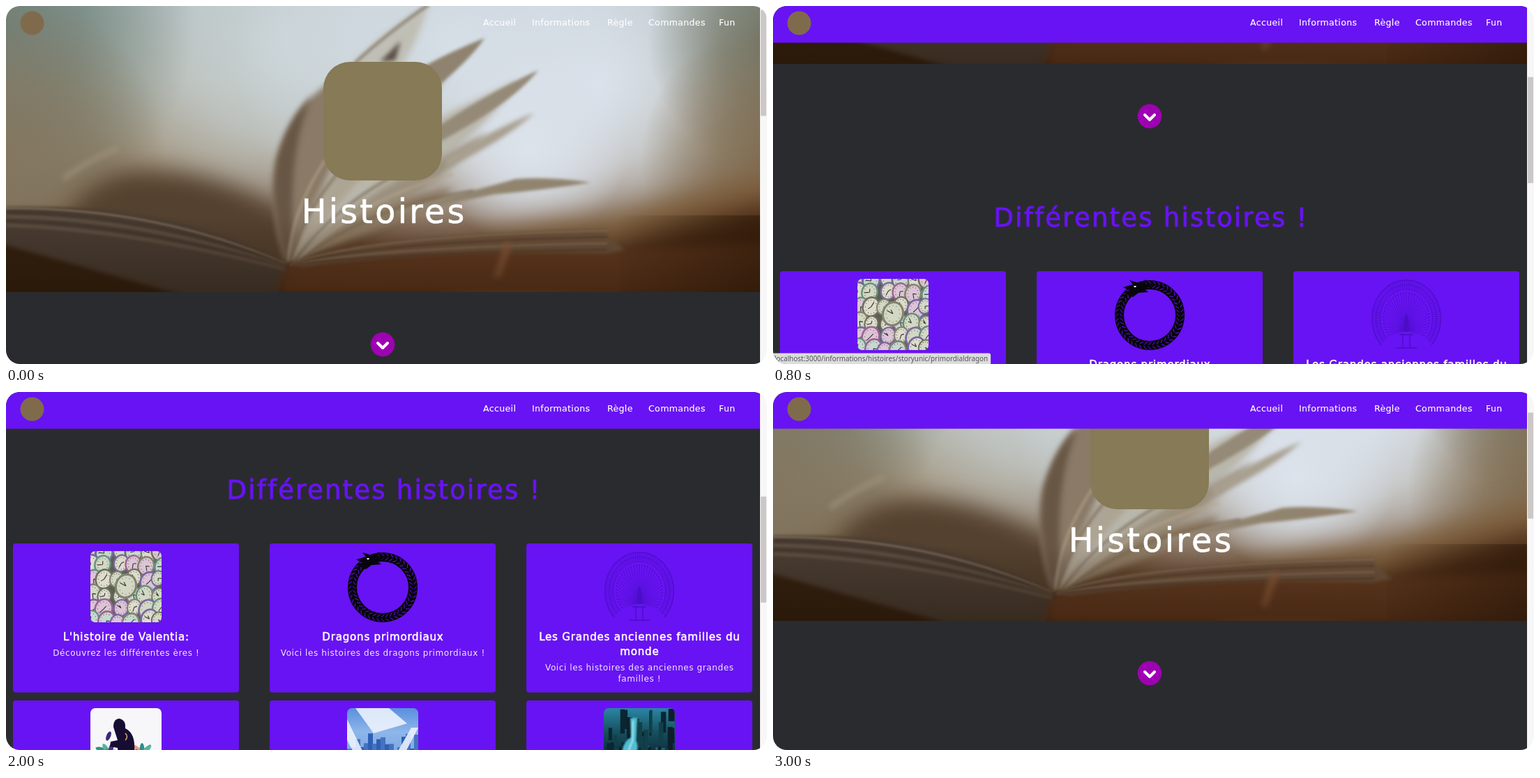
An HTML page with a canvas that plays this animation: 1091 by 513 pixels, repeating every 3200 ms.

```html
<!DOCTYPE html>
<html lang="fr">
<head>
<meta charset="utf-8">
<title>Histoires</title>
<style>
html, body { margin: 0; width: 100%; height: 100%; overflow: hidden; background: #fff; }
canvas { display: block; }
</style>
</head>
<body>
<canvas id="stage" width="1091" height="513"></canvas>
<script>
const W = 1091, H = 513, VIEW = 1081, HERO = 410, TILE = 102;
const STEP = 200, TURN = 8, SCROLL = 81.75;
const PURPLE = '#6813f3', DARK = '#2a2b2f';
const ctx = document.getElementById('stage').getContext('2d');

let seed = 7;
const rnd = () => (seed = (seed * 16807) % 2147483647) / 2147483647;
const pick = list => list[Math.floor(rnd() * list.length)];

function layer(w, h) {
  const c = document.createElement('canvas');
  c.width = w;
  c.height = h;
  return c.getContext('2d');
}

function fill(g, color, path, blur = 0) {
  g.filter = blur ? `blur(${blur}px)` : 'none';
  g.fillStyle = color;
  g.fill(new Path2D(path));
  g.filter = 'none';
}

function line(g, color, width, path, blur = 0) {
  g.filter = blur ? `blur(${blur}px)` : 'none';
  g.strokeStyle = color;
  g.lineWidth = width;
  g.stroke(new Path2D(path));
  g.filter = 'none';
}

function box(g, color, x, y, w, h, r = 0) {
  g.fillStyle = color;
  g.beginPath();
  g.roundRect(x, y, w, h, r);
  g.fill();
}

function oval(g, color, x, y, rx, ry = rx, turn = 0) {
  g.fillStyle = color;
  g.beginPath();
  g.ellipse(x, y, rx, ry, turn, 0, 7);
  g.fill();
}

function glow(g, x, y, r, color) {
  const grad = g.createRadialGradient(x, y, 0, x, y, r);
  grad.addColorStop(0, color);
  grad.addColorStop(0.45, color + 'b0');
  grad.addColorStop(1, color + '00');
  g.fillStyle = grad;
  g.fillRect(x - r, y - r, 2 * r, 2 * r);
}

function ramp(g, x, y, w, h, dx, dy, ...colors) {
  const grad = g.createLinearGradient(x, y, x + dx, y + dy);
  colors.forEach((c, i) => grad.addColorStop(i / (colors.length - 1), c));
  g.fillStyle = grad;
  g.fillRect(x, y, w, h);
}

// size, letter spacing in em, extra weight
const STYLES = {
  hero: [47.5, 0.07, 0.7], heading: [37, 0.06, 0.9], title: [15, 0.055, 0.55],
  body: [12, 0.05, 0], nav: [12.5, 0.03, 0.15]
};

function text(g, style, str, x, y, color = '#fff', align = 'center') {
  const [size, gap, bold] = STYLES[style];
  g.font = `${size}px "DejaVu Sans", sans-serif`;
  g.letterSpacing = size * gap + 'px';
  g.textAlign = align;
  if (align === 'center') x += size * gap / 2;
  g.fillStyle = g.strokeStyle = color;
  g.fillText(str, x, y);
  if (bold) {
    g.lineWidth = bold;
    g.lineJoin = 'round';
    g.strokeText(str, x, y);
  }
  g.letterSpacing = '0px';
}

function sky(g) {
  ramp(g, 0, 0, VIEW, HERO, 0, HERO, '#a3b0ae', '#a9a897', '#9b8a70', '#74553a', '#3c2412');
  glow(g, 400, 50, 310, '#c9d3d6');
  glow(g, 640, 60, 310, '#d5dee6');
  glow(g, 850, 110, 270, '#dae2ec');
  glow(g, 750, 205, 140, '#dce3ec');
  glow(g, -20, 30, 290, '#6d8079');
  glow(g, -10, 215, 240, '#83765f');
  glow(g, 1110, 50, 190, '#6f7363');
  glow(g, 1110, 220, 200, '#7f6c51');

  fill(g, '#54412f', 'M90 300Q120 246 190 238Q290 232 410 300V390L60 340Z', 16);
  fill(g, '#80613f', 'M640 345Q760 300 850 305Q960 275 1110 235V430H640Z', 18);
  fill(g, '#4a2b16', 'M830 360Q950 315 1110 275V430H800Z', 18);
  line(g, '#a3957f', 5, 'M82 248Q115 222 160 204', 4);
}

// pages fanned out above the fold
function fan(g) {
  fill(g, '#c0bfb6', 'M470 115Q520 50 606 -4Q590 60 545 120L480 200Z', 4);
  line(g, '#8b8273', 4, 'M500 82Q545 40 606 -2', 2);
  fill(g, '#8a7a67', 'M402 370Q374 290 388 220Q408 150 460 112L540 100Q480 190 402 370Z', 4);
  fill(g, '#685645', 'M402 370Q376 290 388 220Q404 160 440 128Q404 200 412 330Z', 4);
  fill(g, '#5a4f43', 'M536 80L566 50L558 78Z', 3);
  fill(g, '#aca596', 'M408 367Q440 250 560 135L640 82Q590 180 480 280Z', 5);
  fill(g, '#b9b6ab', 'M412 364Q500 230 640 150L735 106Q680 190 540 285Z', 5);
  fill(g, '#9b907e', 'M416 362Q500 270 620 220L690 180Q640 240 530 305Z', 5);
  fill(g, '#8c7a63', 'M420 360Q520 278 640 262Q600 300 420 360Z', 4);
  fill(g, '#8f836f', 'M600 86Q640 64 686 46Q664 80 600 130Z', 2);
  fill(g, '#958a77', 'M600 186Q680 130 763 92Q724 142 600 206Z', 2);
  fill(g, '#a89f8f', 'M630 218Q700 176 758 153Q704 200 630 232Z', 3);
  fill(g, '#91846f', 'M560 292Q660 268 730 248Q780 244 838 253Q770 264 700 270Q620 286 560 300Z', 2);
  for (let i = 0; i < 6; i++) {
    line(g, i % 2 ? '#77654f' : '#b3a48b', 2.5,
      `M${405 + i * 3} 366Q${412 + i * 22} ${255 + i * 6} ${520 + i * 30} ${145 + i * 24}`, 2);
  }
}

function book(g) {
  // left block
  fill(g, '#493d33', 'M0 288Q180 284 300 325Q370 348 402 374L390 415H-10Z', 2);
  fill(g, '#33200f', 'M-10 340L255 415H-10Z', 3);
  line(g, '#8a7660', 2, 'M0 290Q215 288 400 369', 1.5);
  for (let i = 1; i < 5; i++) {
    line(g, i % 2 ? '#41352b' : '#6e5d4c', 3, `M0 ${290 + i * 6}Q${210 - i * 8} ${288 + i * 8} 400 ${369 + i * 2}`, 2);
  }

  // right block
  fill(g, '#623a20', 'M402 374L640 346L880 348L1100 340V415H388Z', 7);
  fill(g, '#6b523c', 'M405 371Q500 328 860 320L864 330L888 350L860 355Q640 346 425 374Z', 2.5);
  for (let i = 0; i < 4; i++) {
    line(g, i % 2 ? '#533c2b' : '#87705a', 2.2, `M408 371Q${500 + i * 15} ${330 + i * 8} 862 ${322 + i * 9}`, 1.6);
  }
  fill(g, '#87583a', 'M716 336L725 343L707 391L700 388Z', 4);
}

function hero(g) {
  g.save();
  g.beginPath();
  g.rect(0, 0, VIEW, HERO);
  g.clip();
  sky(g);
  fan(g);
  book(g);
  ramp(g, 0, 300, VIEW, 110, 0, 110, '#1c0d0000', '#1c0d0060');
  ramp(g, 880, 300, 201, 110, 201, 60, '#1c0d0000', '#1c0d0070');
  g.restore();
}

function clocks(g) {
  g.fillStyle = '#5b6054';
  g.fillRect(0, 0, TILE, TILE);
  const dial = (x, y, r) => {
    const a = rnd() * 6;
    oval(g, pick(['#6e705c', '#9c6594', '#66917e', '#77699f', '#83836f']), x, y, r, r * 1.15, 0.3);
    oval(g, pick(['#d3d8c4', '#dcc4d6', '#c6d8cf', '#dddccd']), x, y, r * 0.8, r * 0.95, 0.3);
    for (let i = 0; i < 12; i++) {
      oval(g, '#55564d', x + Math.cos(i * Math.PI / 6) * r * 0.62, y + Math.sin(i * Math.PI / 6) * r * 0.75, 0.6);
    }
    line(g, '#33342f', 1.1, `M${x} ${y}l${Math.cos(a) * r * 0.6} ${Math.sin(a) * r * 0.6}M${x} ${y}l${Math.sin(a) * r * 0.4} ${Math.cos(a) * r * 0.4}`);
  };
  for (let j = 0; j < 6; j++) {
    for (let i = 0; i < 6; i++) dial(i * 20 + rnd() * 8 - 3, j * 20 + rnd() * 8 - 3, 10 + rnd() * 4);
  }
  dial(51, 50, 16);
}

function serpent(g) {
  g.strokeStyle = '#08060d';
  g.lineWidth = 13;
  g.beginPath();
  g.arc(51, 52, 43.5, 0, 7);
  g.stroke();
  for (let i = 0; i < 44; i++) {
    g.save();
    g.translate(51, 52);
    g.rotate(i * Math.PI / 22);
    line(g, PURPLE, 0.9, 'M39 -2L43 2M45 2L49 -2');
    g.restore();
  }
  fill(g, '#08060d', 'M13 12L27 8L22 2L36 6L46 1L44 8L54 10L44 15L49 19L35 20L27 26L13 20L22 17Z');
  oval(g, '#fff', 30, 11, 1.8, 0.9);
}

function plume(g) {
  const ink = '#4b0dc6';
  const arch = (k, w) => {
    g.strokeStyle = ink;
    g.lineWidth = w;
    g.beginPath();
    g.ellipse(51, 57, 50 * k, 56 * k, 0, Math.PI * 0.76, Math.PI * 2.24);
    g.stroke();
  };
  arch(0.985, 1.2);
  arch(0.87, 0.8);
  arch(0.75, 0.9);
  for (let i = 0; i <= 72; i++) {
    const a = Math.PI * (0.78 + i * 1.44 / 72), c = Math.cos(a), s = Math.sin(a);
    line(g, ink, 0.8, `M${51 + 38 * c} ${57 + 43 * s}L${51 + 49 * c} ${57 + 55 * s}`);
    if (i % 2) continue;
    line(g, ink, 0.7, `M51 74L${51 + 33 * c} ${57 + 37 * s}`);
    oval(g, ink, 51 + 33 * c, 57 + 37 * s, 1);
  }
  fill(g, ink, 'M48 56L51 50L54 56V76H48Z');
  line(g, ink, 1.4, 'M46 78V98M56 78V98M41 80H61M36 99H66');
}

function prayer(g) {
  g.fillStyle = '#f7f7fa';
  g.fillRect(0, 0, TILE, TILE);
  oval(g, '#dfe3f2', 51, 85, 38, 4);
  const tones = ['#2f8f86', '#ee9a86', '#4a2f8f', '#59b29a'];
  for (let i = 0; i < 9; i++) {
    oval(g, tones[i % 4], 17 + i * 2, 60 + (i % 3) * 8, 3.5, 10, (i - 5) * 0.25);
    oval(g, tones[(i + 1) % 4], 68 + i * 2, 60 + (i % 3) * 8, 3.5, 10, (i - 3) * 0.25);
  }
  oval(g, '#3a2a78', 26, 40, 3, 7, 0.4);
  fill(g, '#170d33', 'M33 27Q33 15 42 15Q51 17 50 29Q65 36 63 62Q77 72 77 82Q60 88 25 84Q23 74 40 68L39 57L28 55L29 48L39 46Z');
  line(g, '#e7bd6a', 1.3, 'M50 36Q55 41 50 46');
  oval(g, '#b9c0d8', 60, 91, 9, 1);
}

function skyCity(g) {
  ramp(g, 0, 0, TILE, TILE, 0, TILE, '#5a8fdd', '#8db6ea', '#7ba6e0', '#4675c6');
  for (let i = 0; i < 17; i++) {
    const h = 10 + rnd() * 26;
    box(g, i % 2 ? '#2f5fb4' : '#4473c2', i * 6, 72 - h, 7, h + 8);
  }
  for (let i = 0; i < 16; i++) oval(g, i % 2 ? '#b9d2f3' : '#6796da', rnd() * 102, 76 + rnd() * 20, 11, 4);
  fill(g, '#eef4fee0', 'M12 0H60L86 22L38 36Z');
  fill(g, '#eef4fee0', 'M0 16L42 102H30L0 46Z');
  fill(g, '#eef4fee0', 'M102 28L68 93H102V102H50L92 28Z');
}

function seaRealm(g) {
  ramp(g, 0, 0, TILE, TILE, 0, TILE, '#2a86a4', '#17505f', '#0b2b36', '#0d3a48');
  for (let i = 0; i < 46; i++) {
    const x = rnd() * 102;
    box(g, pick(['#0a2630', '#123f49', '#1f6470', '#0e1f2a']), x, rnd() * 80, 3 + rnd() * 6, 12 + rnd() * 28);
  }
  fill(g, '#52bdd2', 'M38 14H48L46 46Q53 60 40 74L45 102H14L28 76Q22 52 39 42Z', 1);
  line(g, '#a9e9ee', 2, 'M42 18L41 48Q34 60 35 74L27 102', 1);
}

function stars(g) {
  ramp(g, 0, 0, TILE, TILE, 0, TILE, '#08061a', '#120c3c');
  glow(g, 38, 30, 28, '#2a1c78');
  for (let i = 0; i < 50; i++) oval(g, pick(['#2f4fc0', '#5a54c8', '#8aa0ff']), rnd() * 102, rnd() * 102, 0.4 + rnd() * 0.7);
}

function nebula(g) {
  ramp(g, 0, 0, TILE, TILE, TILE, 0, '#0a0610', '#1d0730', '#620787', '#9a08a6');
  fill(g, '#0c0714', 'M0 0H30L46 102H0Z', 5);
}

function mist(g) {
  ramp(g, 0, 0, TILE, TILE, 0, TILE, '#c9cec6', '#dfe4e2', '#7f877c');
  for (let i = 0; i < 14; i++) {
    const x = i < 7 ? i * 5 : 102 - (i - 7) * 5;
    const top = 2 + (i % 7) * 4;
    fill(g, '#4b554ab0', `M${x} ${top}L${x + 9} 70H${x - 9}Z`, 1.5);
  }
}

const CARDS = [
  [clocks, ["L'histoire de Valentia:"], ['Découvrez les différentes ères !']],
  [serpent, ['Dragons primordiaux'], ['Voici les histoires des dragons primordiaux !']],
  [plume, ['Les Grandes anciennes familles du', 'monde'], ['Voici les histoires des anciennes grandes', 'familles !']],
  [prayer, ['Les religions'], ['Découvrez les différentes religions !']],
  [skyCity, ['Euphoria, la cité nuage'], ['Découvrez la cité des nuages !']],
  [seaRealm, ["Le royaume sous-marin, l'Atlantide"], ["Découvrez l'Atlantide, Royaume sous-marin !"]],
  [stars, [], []], [nebula, [], []], [mist, [], []]
];
const ROWS = [[707, 213.5], [932, 177], [1120, 177]];

function card(g, [art, titles, lines], i) {
  const [y, h] = ROWS[Math.floor(i / 3)];
  const cx = 172 + (i % 3) * 368;
  box(g, PURPLE, cx - 162, y, 324, h, 4);
  g.save();
  g.translate(cx - 51, y + 11);
  g.beginPath();
  g.roundRect(0, 0, TILE, TILE, 7);
  g.clip();
  art(g);
  g.restore();
  titles.forEach((t, n) => text(g, 'title', t, cx, y + 139 + n * 20.5));
  const top = y + 161 + (titles.length - 1) * 20.5;
  lines.forEach((t, n) => text(g, 'body', t, cx, top + n * 16.5, '#f0eaff'));
}

function chevron(g, x, y) {
  oval(g, '#9d02b2', x, y, 17.3);
  g.lineCap = g.lineJoin = 'round';
  line(g, '#fff', 4, `M${x - 7} ${y - 2}L${x} ${y + 5}L${x + 7} ${y - 2}`);
  g.lineCap = 'butt';
}

function buildPage() {
  const g = layer(VIEW, 1200);
  g.fillStyle = DARK;
  g.fillRect(0, 0, VIEW, 1200);
  hero(g);
  box(g, '#867a57', 455, 80, 170, 170, 38);
  text(g, 'hero', 'Histoires', 540.5, 310.5);
  chevron(g, 540, 485);
  text(g, 'heading', 'Différentes histoires !', 541, 643, PURPLE);
  CARDS.forEach((c, i) => card(g, c, i));
  return g.canvas;
}

const LINKS = [['Accueil', 684], ['Informations', 754], ['Règle', 862], ['Commandes', 921], ['Fun', 1022]];
const HOVER = { 4: 'primordialdragon', 7: 'euphoria' };

function navbar(solid) {
  if (solid) {
    ctx.fillStyle = PURPLE;
    ctx.fillRect(0, 0, VIEW, 52.6);
  }
  oval(ctx, '#7f6b4c', 37.5, 24.5, 17);
  LINKS.forEach(([t, x]) => text(ctx, 'nav', t, x, 28.3, '#fff', 'left'));
}

function status(name) {
  const url = 'localhost:3000/informations/histoires/storyunic/' + name;
  ctx.font = '9.9px "Noto Sans", sans-serif';
  ctx.textAlign = 'left';
  box(ctx, '#dcdcdd', 0, 497.5, ctx.measureText(url).width + 6, 16, [0, 3, 0, 0]);
  ctx.fillStyle = '#505256';
  ctx.fillText(url, 2, 509);
}

const page = buildPage();

function draw(now) {
  const step = Math.floor(now / STEP) % (2 * TURN);
  const pos = step <= TURN ? step : 2 * TURN - step;
  ctx.fillStyle = '#fff';
  ctx.fillRect(0, 0, W, H);
  ctx.save();
  ctx.beginPath();
  ctx.roundRect(0, 0, W, H, 20);
  ctx.clip();
  ctx.drawImage(page, 0, -Math.round(pos * SCROLL - 0.1));
  navbar(pos > 0);
  if (HOVER[pos]) status(HOVER[pos]);
  box(ctx, '#f8f7f7', VIEW, 0, W - VIEW, H);
  box(ctx, '#cbc8c7', VIEW + 1, 5.5 + pos * 24.05, 8, 152, 1);
  ctx.restore();
}

const start = performance.now();
function loop() {
  draw(performance.now() - start);
  requestAnimationFrame(loop);
}
loop();
</script>
</body>
</html>
```
